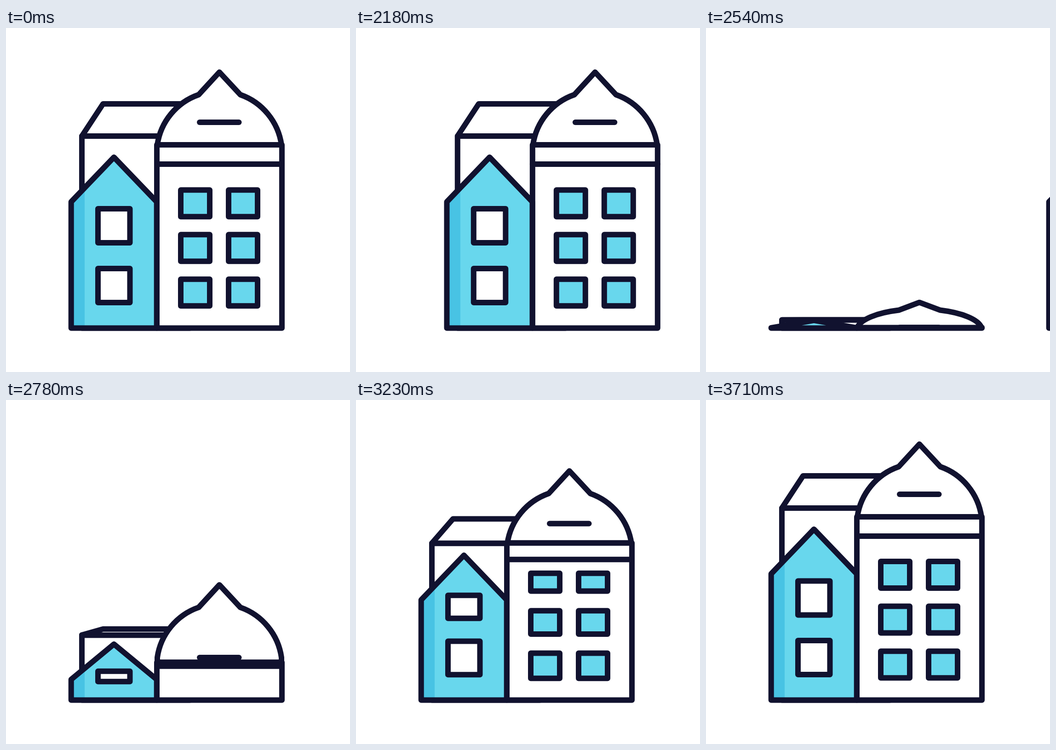
An HTML page with a canvas that plays this animation: 748 by 748 pixels, repeating every 3.74 s.

```html
<!DOCTYPE html>
<html lang="en">
<head>
<meta charset="utf-8">
<title>City buildings</title>
<style>
  html, body { margin: 0; width: 100%; height: 100%; overflow: hidden; background: #fff; }
  canvas { display: block; }
</style>
</head>
<body>
<canvas id="stage" width="748" height="748"></canvas>
<script>
const ctx = document.getElementById('stage').getContext('2d');
const LOOP = 3740, STEP = 30, FIRST_MOVE = 2030, SLIDE = 2000, GROW = 2500;
const GROUND = 652.6;
const INK = '#11122f', CYAN = '#68d7ed', SHADE = '#48c3e4', WHITE = '#fff';

const clamp = x => Math.min(1, Math.max(0, x));
const easeOut = x => 1 - (1 - clamp(x)) ** 3;

// Cubic ease with handles (x1, 0) and (x2, 1)
function ease(x, x1, x2) {
  x = clamp(x);
  let lo = 0, hi = 1;
  for (let i = 0; i < 30; i++) {
    const u = (lo + hi) / 2, v = 1 - u;
    if (3 * v * v * u * x1 + 3 * v * u * u * x2 + u ** 3 < x) lo = u; else hi = u;
  }
  return lo * lo * (3 - 2 * lo);
}

function shape(points, fill, stroke = true) {
  const path = new Path2D('M' + points.join('L') + 'Z');
  paint(path, fill, stroke);
}

function paint(path, fill, stroke = true) {
  if (fill) { ctx.fillStyle = fill; ctx.fill(path); }
  if (stroke) ctx.stroke(path);
}

function line(x1, x2, y) {
  paint(new Path2D(`M${x1} ${y}H${x2}`));
}

// A window rises into place while it opens; open is undefined before it appears
function pane(x, w, centre, height, rise, open, fill) {
  if (open === undefined) return;
  const h = height * open, y = centre + rise * (1 - open) - h / 2;
  shape([[x, y], [x + w, y], [x + w, y + h], [x, y + h]], fill);
}

function backBlock(s) {
  const eave = GROUND - s.back, top = eave - 70 * s.backRoof;
  shape([[165, GROUND], [165, eave], [400, eave], [400, GROUND]], WHITE);
  shape([[165, eave], [211, top], [400, top], [400, eave]], WHITE);
}

function tower(s) {
  const at = h => GROUND - h * s.tower;
  const d = s.dome, base = GROUND - 398.6 * s.lift, shoulder = base - 109 * d;
  shape([[328, GROUND], [328, at(398.6)], [600, at(398.6)], [600, GROUND]], WHITE);
  s.towerPanes.forEach((open, i) => {
    for (const x of [380, 484]) pane(x, 63, 575.2 - i * s.towerPitch, 58, 49, open, CYAN);
  });
  line(328, 600, at(356.6));
  const arc = `A136 ${136 * d} 0 0 1 `;
  paint(new Path2D(`M329 ${at(398.6)}V${base}${arc}419 ${shoulder}L464 ${base - 158 * d}` +
    `L509.5 ${shoulder}${arc}599 ${base}V${at(398.6)}Z`), WHITE);
  line(421, 506.5, at(447.6));
}

function house(s) {
  const eave = GROUND - 274.6 * s.house, roof = 97 * s.gable;
  const left = 141.7, mid = 234.7, right = 327.7;
  const outline = [[left, GROUND], [left, eave], [mid, eave - roof], [right, eave], [right, GROUND]];
  shape(outline, CYAN, false);
  shape([[left, GROUND], [left, eave], [171, eave - roof * (171 - left) / (mid - left)],
    [171, GROUND]], SHADE, false);
  shape(outline);
  s.housePanes.forEach((open, i) =>
    pane(200, 69.5, 560 - i * s.housePitch, 74, 59, open, WHITE));
}

function city(s, dx = 0) {
  ctx.save();
  ctx.translate(dx, 0);
  backBlock(s);
  tower(s);
  house(s);
  ctx.restore();
}

const rest = {
  back: 417.6, backRoof: 1, tower: 1, lift: 1, dome: 1, house: 1, gable: 1,
  towerPanes: [1, 1, 1], towerPitch: 97, housePanes: [1, 1], housePitch: 130
};

function growing(t) {
  const x = t / 1210;
  const open = start => t < start ? undefined : easeOut((t - start) / 700);
  return {
    back: 10 + 407.6 * ease(x, .113, .475),
    backRoof: ease(x, .287, .518),
    tower: ease(x, .356, .275),
    lift: ease(x, .317, .298),
    dome: easeOut(t / 305),
    house: ease(x, .36, .417),
    gable: easeOut(t / 690),
    towerPanes: [297, 379, 514].map(open), towerPitch: 97.6,
    housePanes: [200, 511].map(open), housePitch: 129.5
  };
}

function draw(t) {
  ctx.fillStyle = WHITE;
  ctx.fillRect(0, 0, 748, 748);
  ctx.strokeStyle = INK;
  ctx.lineWidth = 12;
  ctx.lineJoin = ctx.lineCap = 'round';
  if (t > GROW) city(growing(t - GROW));
  const k = Math.max(0, t - SLIDE);
  const dx = .001548 * k ** 2 + 9.69e-7 * k ** 3;
  if (dx < 620) city(rest, dx);
}

const begin = performance.now();
function tick() {
  const t = (performance.now() - begin) % LOOP;
  draw(t < FIRST_MOVE ? 0 : FIRST_MOVE + STEP * Math.floor((t - FIRST_MOVE) / STEP));
  requestAnimationFrame(tick);
}
tick();
</script>
</body>
</html>
```
